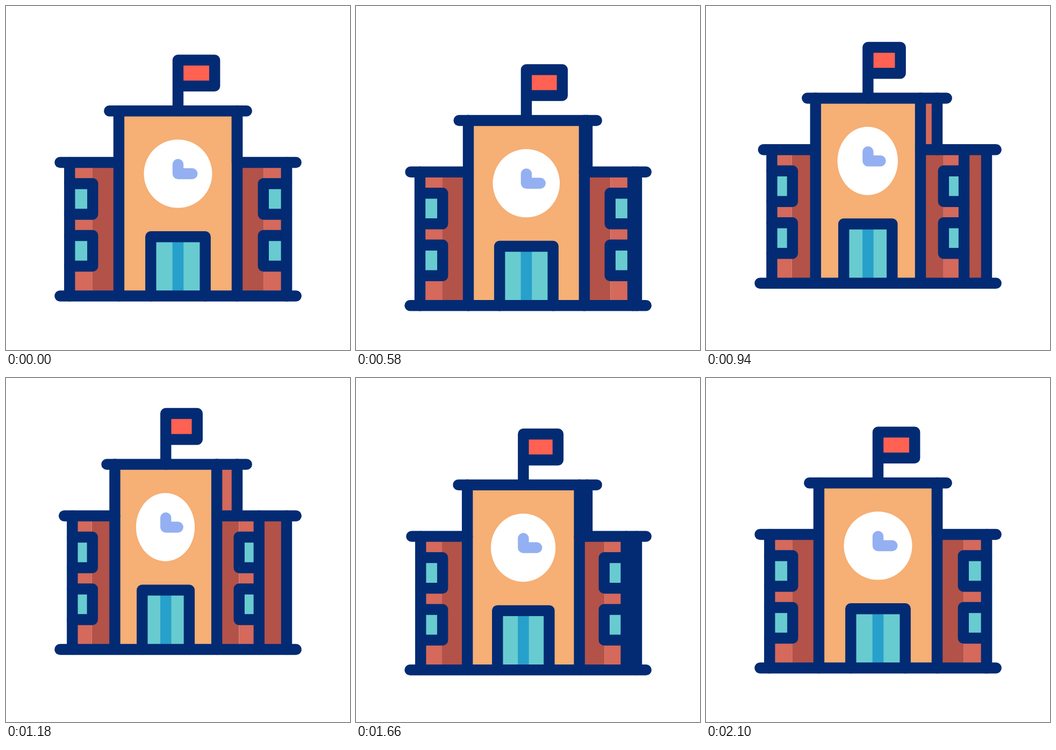
An HTML page that plays this animation: 640 px wide and 640 px high, repeating every 2.4 s.

```html
<!DOCTYPE html>
<html lang="en">
<head>
<meta charset="utf-8">
<title>School building</title>
<style>
  html, body { margin: 0; width: 100%; height: 100%; overflow: hidden; background: #fff; }
  svg { display: block; width: 100%; height: 100%; }
</style>
</head>
<body>
<svg id="stage" viewBox="0 0 640 640"></svg>
<script>
const NS = 'http://www.w3.org/2000/svg';
const LOOP = 2400;
const NAVY = '#032b73', ORANGE = '#f6af74', LIGHT = '#d4695c', DARK = '#b35248',
      TEAL = '#68cbd0', BLUE = '#27a0cb', RED = '#ff6152', HAND = '#94b0f2';

function add(parent, tag, attrs) {
  const el = parent.appendChild(document.createElementNS(NS, tag));
  for (const name in attrs) el.setAttribute(name, attrs[name]);
  return el;
}

const building = add(document.getElementById('stage'), 'g', {});
const updates = [];

// An x is a number, or a pair [front view, turned view].
const at = (x, turn) => Array.isArray(x) ? x[0] + (x[1] - x[0]) * turn : x;

function area(fill, left, right, top, bottom) {
  const el = add(building, 'rect', { fill, y: top, height: bottom - top });
  updates.push(turn => {
    const x = at(left, turn);
    el.setAttribute('x', x);
    el.setAttribute('width', Math.max(0, at(right, turn) - x));
  });
}

function line(points, stroke = NAVY) {
  const el = add(building, 'polyline', {
    fill: 'none', stroke, 'stroke-width': 20.4,
    'stroke-linecap': 'round', 'stroke-linejoin': 'round'
  });
  updates.push(turn => el.setAttribute('points',
    points.map(([x, y]) => at(x, turn) + ',' + y).join(' ')));
}

const wall = (x, top) => line([[x, top], [x, 539.5]]);

// Window frame open towards the wall it sits on
function windowAt(wallX, edgeX, top) {
  area(TEAL, ...(at(wallX, 0) < at(edgeX, 0) ? [wallX, edgeX] : [edgeX, wallX]), top, top + 57);
  line([[wallX, top], [edgeX, top], [edgeX, top + 57], [wallX, top + 57]]);
}

const leftWall = [118.3, 123.7], leftFront = [210, 202], rightFront = [430, 389.7],
      rightWall = [522, 467.5], pole = [320, 295.8], flagEnd = [388.2, 353.7],
      doorLeft = [269.3, 252.3], doorRight = [370.7, 339];

// Wings and the side that turns into view
area(LIGHT, leftWall, [160.3, 159.5], 291, 539);
area(DARK, [160.3, 159.5], leftFront, 291, 539);
area(LIGHT, rightFront, 430, 195, 291);
area(DARK, rightFront, [479.7, 430.5], 291, 539);
area(LIGHT, [479.7, 430.5], rightWall, 291, 539);
area(DARK, rightWall, 522, 291, 539);
area(ORANGE, leftFront, rightFront, 195, 539);

for (const top of [330.5, 427]) {
  windowAt(leftWall, [161.3, 160.8], top);
  windowAt(rightWall, [478.8, 430.8], top);
}

// Door
area(TEAL, doorLeft, doorRight, 429, 539);
area(BLUE, [309.7, 285.6], [330.3, 306], 429, 539);
line([[doorLeft, 539.5], [doorLeft, 429.2], [doorRight, 429.2], [doorRight, 539.5]]);

// Clock
const face = add(building, 'ellipse', { fill: '#fff', cy: 312, ry: 63.5 });
updates.push(turn => {
  face.setAttribute('cx', at([320, 295], turn));
  face.setAttribute('rx', at([63.5, 54], turn));
});
line([[pole, 294.8], [pole, 312], [[346.3, 318], 312]], HAND);

// Flag
area(RED, pole, flagEnd, 100.5, 148.8);
line([[pole, 195], [pole, 100.6], [flagEnd, 100.6], [flagEnd, 148.9], [pole, 148.9]]);

wall(leftWall, 291);
wall(rightWall, 291);
wall(522, 291);
wall(leftFront, 195);
wall(rightFront, 195);
line([[430, 195], [430, 291]]);
line([[[192.3, 187.2], 195.2], [447.7, 195.2]]);
line([[[100.5, 108.7], 291], [leftFront, 291]]);
line([[rightFront, 291], [539.7, 291]]);
line([[100.5, 539.5], [539.7, 539.5]]);

function bezier(x1, y1, x2, y2) {
  const curve = (a, b, s) => 3 * a * s * (1 - s) ** 2 + 3 * b * s * s * (1 - s) + s ** 3;
  return u => {
    let low = 0, high = 1;
    for (let i = 0; i < 24; i++) {
      const mid = (low + high) / 2;
      if (curve(x1, x2, mid) < u) low = mid; else high = mid;
    }
    return curve(y1, y2, (low + high) / 2);
  };
}

const hop = bezier(0.3, 0, 0.55, 1);
const rise = bezier(0.2, 0.15, 0.25, 1);
const swing = bezier(0.22, 0.15, 0.25, 1);

// Each key: time, value, easing towards it
const heightKeys = [[200, 0], [480, 27, hop], [1500, -38.5, rise], [1800, 27, hop], [2100, 0, hop]];
const turnKeys = [[480, 0], [1500, 1, swing], [1800, 0, hop]];

function valueAt(keys, time) {
  if (time <= keys[0][0]) return keys[0][1];
  for (let i = 1; i < keys.length; i++) {
    const [start, from] = keys[i - 1], [end, to, ease] = keys[i];
    if (time < end) return from + (to - from) * ease((time - start) / (end - start));
  }
  return keys[keys.length - 1][1];
}

function draw(time) {
  const turn = valueAt(turnKeys, time);
  building.setAttribute('transform', `translate(0 ${valueAt(heightKeys, time)})`);
  for (const update of updates) update(turn);
}

const began = performance.now();
function tick() {
  draw((performance.now() - began) % LOOP);
  requestAnimationFrame(tick);
}
tick();
</script>
</body>
</html>
```
